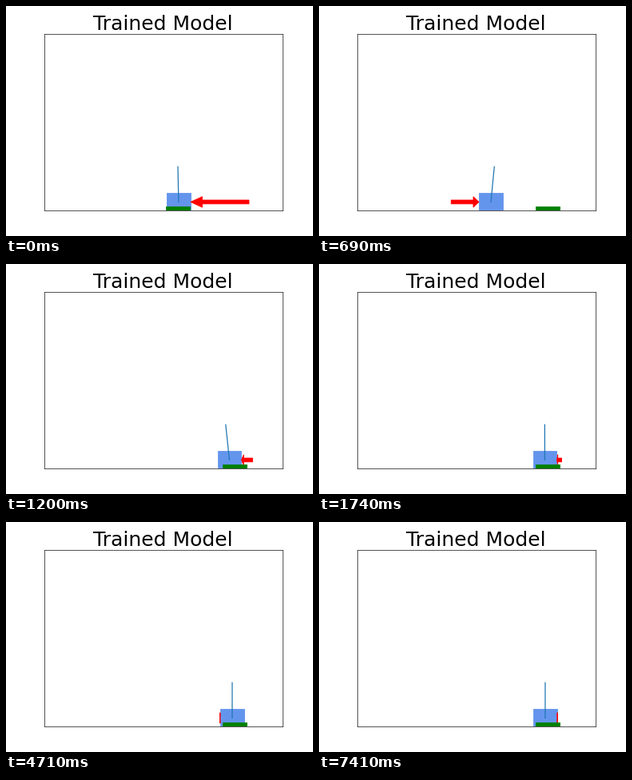
Write a matplotlib script that moves like this. It is 384 px wide and 288 px high and loops after 8000 ms.

```python
import numpy as np
import matplotlib.pyplot as plt
from matplotlib.animation import FuncAnimation
from matplotlib.patches import Polygon, Rectangle

STEP, LOOP, TICK = 20, 8000, 30
FLOOR, CART_TOP, AXLE, POLE_TOP = 256.32, 234, 245.4, 201.2
CART_HALF, GOAL_HALF, GOAL_TOP = 14.85, 15, 251
HEAD_HALF, SHAFT_HALF = 6.7, 2.4
SETTLED, NUDGE = 2300, 0.25

# spans (ms) in which the tiny balancing push comes from the right
RIGHT_PUSHES = [(2940, 3090), (3600, 3720), (4290, 4320),
                (5180, 5300), (6210, 6340), (7410, LOOP)]


def ease(t, start, end):
    u = np.clip((t - start) / (end - start), 0, 1)
    return u * u * (3 - 2 * u)


def cart_at(t):
    """Back off first, then run to the goal and creep into place."""
    back = 21 * np.sin(min(t / 300, 1) * np.pi / 2)
    return (215.9 - back + 87.55 * ease(t, 416, 1298)
            + 0.5 * ease(t, 2900, 4700))


def lean_at(t):
    return (-0.9 + 6.3 * ease(t, 0, 250) - 10.6 * ease(t, 600, 1050)
            + 5.2 * ease(t, 1050, 1800))


def push_at(t):
    """Signed arrow length: positive pushes the cart to the right."""
    if t >= SETTLED:
        from_right = any(a <= t < b for a, b in RIGHT_PUSHES)
        return -NUDGE if from_right else NUDGE
    kick = -73 - 45 * ease(t, 0, 30) + 175 * ease(t, 30, 140)
    drive = -19 * ease(t, 140, 400) - 82 * ease(t, 650, 980)
    brake = 33 * ease(t, 980, 1250) + 11 * ease(t, 1250, SETTLED)
    return kick + drive + brake


def arrow_points(cart, push):
    tip = cart - np.sign(push) * (CART_HALF + 0.2)
    neck, tail = tip - 0.2 * push, tip - push
    return [(tip, AXLE),
            (neck, AXLE - HEAD_HALF), (neck, AXLE - SHAFT_HALF),
            (tail, AXLE - SHAFT_HALF), (tail, AXLE + SHAFT_HALF),
            (neck, AXLE + SHAFT_HALF), (neck, AXLE + HEAD_HALF)]


def add_box(half_width, top, color):
    return ax.add_patch(Rectangle((0, top), 2 * half_width, FLOOR - top,
                                  color=color))


fig, ax = plt.subplots(figsize=(6.4, 4.8), dpi=60)
fig.subplots_adjust(left=0.125, right=0.9, bottom=0.11, top=0.88)
ax.set(xlim=(48, 345.6), ylim=(FLOOR, 34.56), xticks=[], yticks=[])
ax.set_title("Trained Model", fontsize=30, family="DejaVu Sans")

cart_box = add_box(CART_HALF, CART_TOP, "cornflowerblue")
arrow = ax.add_patch(Polygon(arrow_points(200, 10), color="red"))
goal_box = add_box(GOAL_HALF, GOAL_TOP, "green")
pole, = ax.plot([], [], color="C0", lw=1.5, snap=False)


def draw(i):
    t = i * STEP + STEP / 2
    if t < SETTLED:
        t = t // TICK * TICK
    cart, push = cart_at(t), push_at(t)
    goal = 215.3 if t < TICK else 286.2

    cart_box.set_x(cart - CART_HALF)
    goal_box.set_x(goal - GOAL_HALF)
    pole.set_data([cart, cart + lean_at(t)], [AXLE, POLE_TOP])
    arrow.set_xy(arrow_points(cart, push))
    idle = SETTLED <= t < RIGHT_PUSHES[0][0]
    arrow.set_color("#1c1c5c" if idle else "red")
    return cart_box, arrow, goal_box, pole


anim = FuncAnimation(fig, draw, frames=LOOP // STEP, interval=STEP,
                     repeat=True, repeat_delay=0)
plt.show()
```
